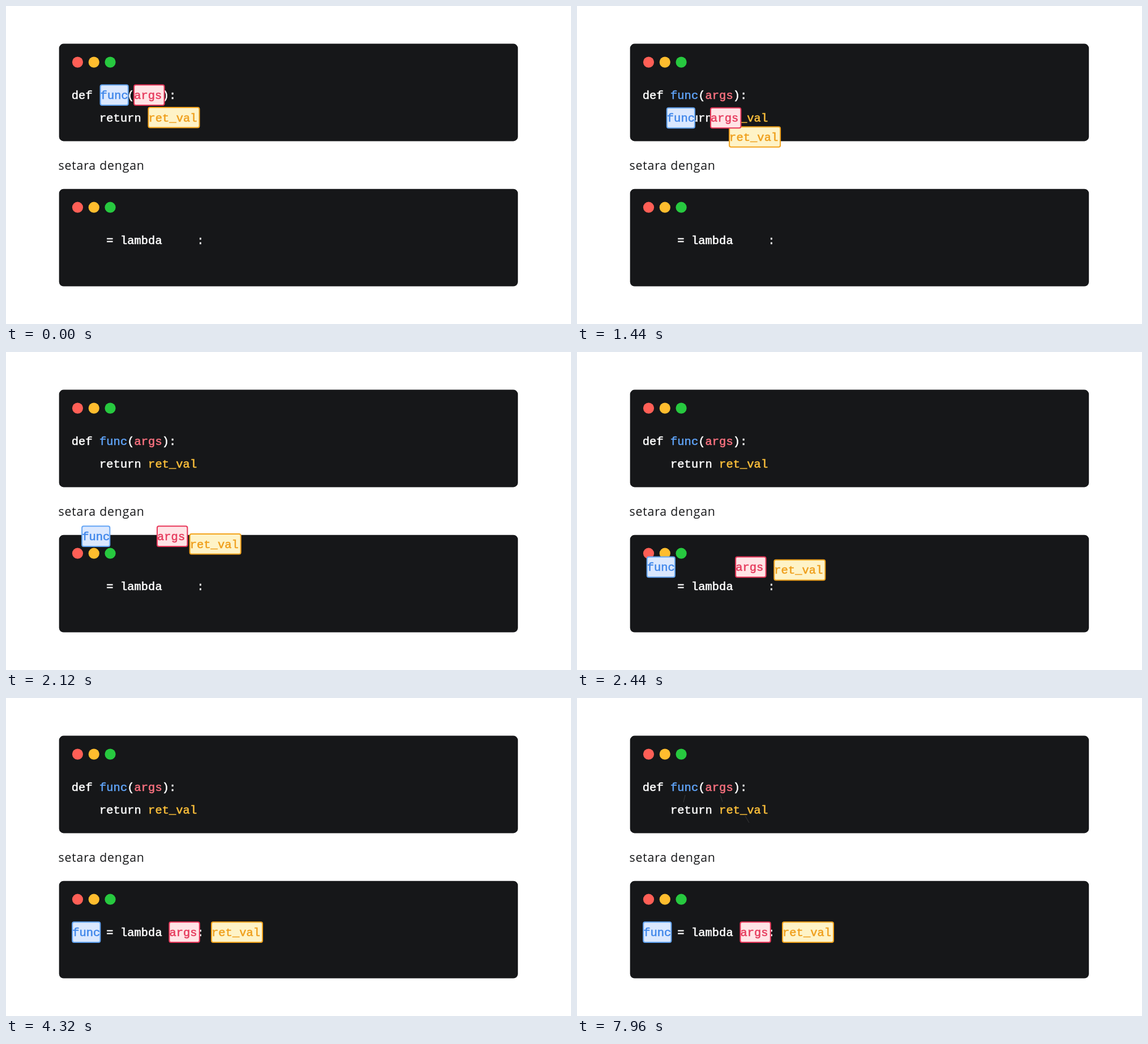
Animation of 998x561 px, one loop 8000 ms. Source, as an HTML page with a canvas:

```html
<!DOCTYPE html>
<html lang="id">
<head>
<meta charset="utf-8">
<title>Fungsi lambda</title>
<style>
  html, body { margin: 0; width: 100%; height: 100%; overflow: hidden; background: #fff; }
  canvas { display: block; }
</style>
</head>
<body>
<canvas id="stage" width="998" height="561"></canvas>
<script>
const ctx = document.getElementById('stage').getContext('2d');
const LOOP = 8000, STEP = 40, MOVE_START = 957, MOVE_TIME = 1920, LINE_START = 7880;
const LEFT = 115.8, ADVANCE = 12.3, SIZE = 20.5;

// Start and end are the outer top-left corners of each tag.
const tags = [
  { text: 'ret_val', w: 92, from: [250.5, 178], to: [362, 394.3], line: [297, 208, 304, 220],
    fill: '#fef3c7', edge: '#f3a31c', ink: '#ef9f1c', plain: '#fbbf3a', col: 11, base: 203.5 },
  { text: 'func', w: 51.2, from: [165.6, 138.3], to: [116.2, 394.3], line: [191.2, 171, 188, 184],
    fill: '#dbe8fe', edge: '#64a5f5', ink: '#3f86ea', plain: '#60a5fa', col: 4, base: 164 },
  { text: 'args', w: 55.4, from: [225.2, 138.3], to: [287.4, 394.3], line: [253, 171, 257, 183],
    fill: '#ffe4e6', edge: '#e8375a', ink: '#e63c5e', plain: '#f8717f', col: 9, base: 164 }
];

function rounded(x, y, w, h, r) {
  ctx.beginPath();
  ctx.roundRect(x, y, w, h, r);
}

function code(text, x, y, color) {
  ctx.font = `${SIZE}px "Liberation Mono", monospace`;
  ctx.letterSpacing = '0px';
  ctx.fillStyle = ctx.strokeStyle = color;
  ctx.lineWidth = 0.55;
  ctx.fillText(text, x, y);
  ctx.strokeText(text, x, y);
}

const codeAt = (text, col, y, color = '#fff') => code(text, LEFT + col * ADVANCE, y, color);

function panel(y) {
  ctx.fillStyle = '#161719';
  rounded(93.7, y, 810.5, 171.8, 8);
  ctx.fill();
  ['#ff5f56', '#ffbd2e', '#27c93f'].forEach((color, i) => {
    ctx.fillStyle = color;
    ctx.beginPath();
    ctx.arc(126.5 + i * 28.8, y + 32.5, 9.6, 0, 7);
    ctx.fill();
  });
}

function drawTag(tag, p) {
  const x = tag.from[0] + (tag.to[0] - tag.from[0]) * p;
  const y = tag.from[1] + (tag.to[1] - tag.from[1]) * p;
  rounded(x + 1, y + 1, tag.w - 2, 35.6, 3);
  ctx.fillStyle = tag.fill;
  ctx.fill();
  ctx.strokeStyle = tag.edge;
  ctx.lineWidth = 2;
  ctx.stroke();
  code(tag.text, x + 1, y + 25.6, tag.ink);
}

function drawLine([x1, y1, x2, y2], k) {
  ctx.strokeStyle = '#3a3b3d';
  ctx.lineWidth = 0.9;
  ctx.beginPath();
  ctx.moveTo(x1, y1);
  ctx.lineTo(x1 + (x2 - x1) * k, y1 + (y2 - y1) * k);
  ctx.stroke();
}

function draw(t) {
  ctx.fillStyle = '#fff';
  ctx.fillRect(0, 0, 998, 561);
  panel(66.6);
  panel(322.7);

  ctx.font = '21.4px "Open Sans", sans-serif';
  ctx.letterSpacing = '0.75px';
  ctx.fillStyle = '#161719';
  ctx.fillText('setara dengan', 92.6, 289);

  const k = Math.min(1, (t - LINE_START + STEP) / (3 * STEP));
  if (k > 0) tags.forEach(tag => drawLine(tag.line, k));

  codeAt('def', 0, 164);
  codeAt('(', 8, 164);
  codeAt('):', 13, 164);
  codeAt('return', 4, 203.5);
  codeAt('= lambda', 5, 420);
  codeAt(':', 18, 420);
  tags.forEach(tag => codeAt(tag.text, tag.col, tag.base, tag.plain));

  const u = Math.min(1, Math.max(0, (t - MOVE_START) / MOVE_TIME));
  const p = u * u * (3 - 2 * u);
  tags.forEach(tag => drawTag(tag, p));
}

const start = performance.now();
function tick(now) {
  const t = Math.max(0, now - start) % LOOP;
  draw(Math.floor(t / STEP) * STEP);
  requestAnimationFrame(tick);
}
draw(0);
requestAnimationFrame(tick);
</script>
</body>
</html>
```
